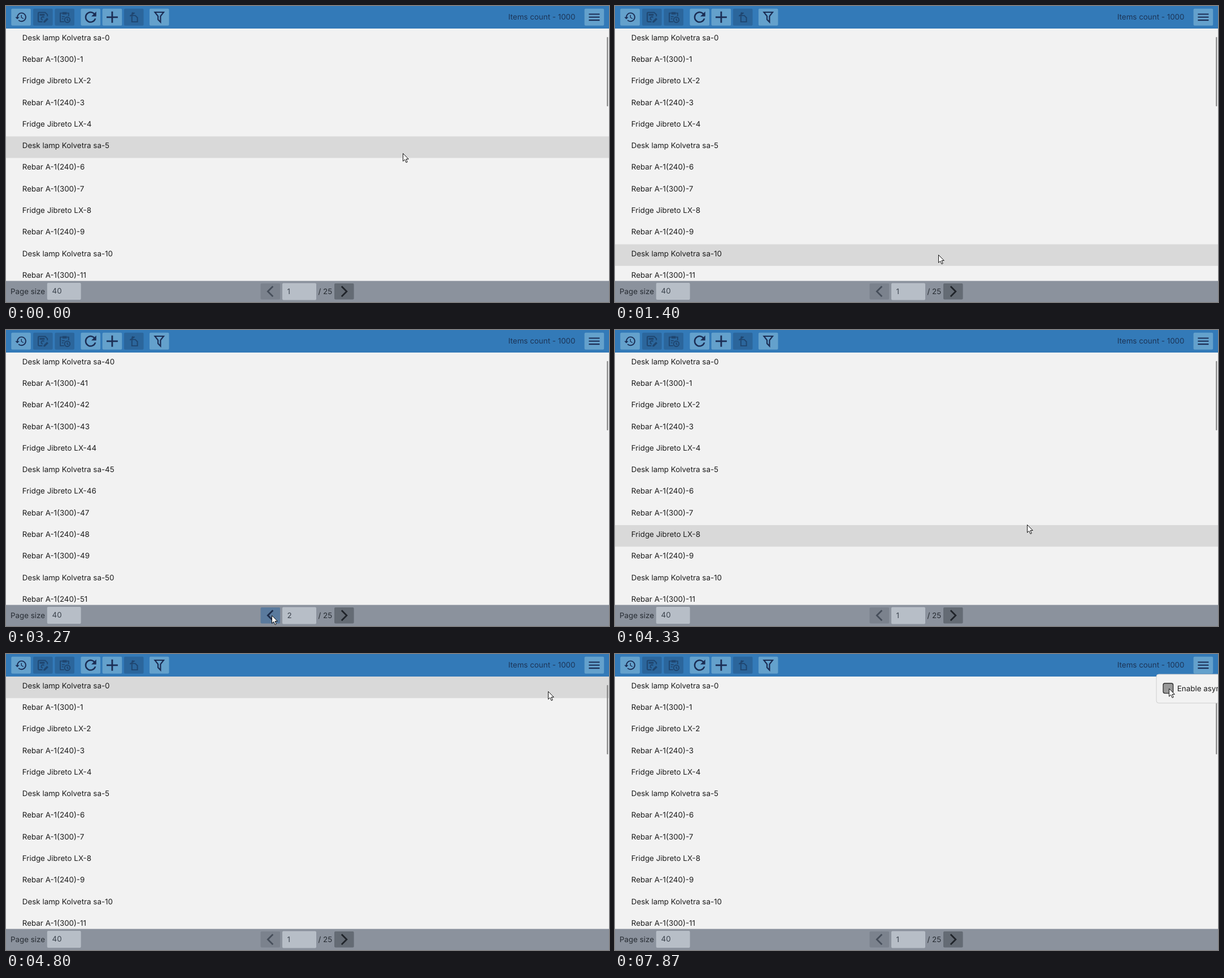
These frames come from a looping animation (1067x525 px, 8 s). An HTML page:

```html
<!DOCTYPE html>
<html lang="en">
<head>
<meta charset="utf-8">
<title>Paged list</title>
<style>
html, body { margin: 0; width: 100%; height: 100%; overflow: hidden; background: #f2f2f2; }
svg { display: block; width: 1067px; height: 525px; }
text { font: 13.39px Inter, sans-serif; fill: #1b1b1b; white-space: pre; text-rendering: geometricPrecision; }
.line { fill: none; stroke-width: 2; }
</style>
</head>
<body>
<svg id="stage" viewBox="0 0 1067 525">
  <rect width="1067" height="525" fill="#f2f2f2"/>
  <rect id="highlight" width="1067" height="38.26" fill="#d9d9d9"/>
  <g id="rows"></g>
  <path d="M1064.3 56V177" stroke="#7c7c7c" stroke-width="2" stroke-linecap="round"/>

  <rect width="1067" height="40" fill="#337ab8"/>
  <text x="888.8" y="24.2" style="fill:#1d3557">Items count - 1000</text>
  <g id="tools"></g>

  <rect y="487.6" width="1067" height="38" fill="#8b929d"/>
  <g fill="#b7bec7">
    <rect x="72.8" y="491" width="59.8" height="30" rx="2"/>
    <rect x="489" y="491.5" width="60" height="30" rx="2"/>
  </g>
  <text x="8" y="511" style="fill:#272c33">Page size</text>
  <text x="81.5" y="510.3" style="fill:#3a424c">40</text>
  <text id="page" x="497.5" y="511" style="fill:#3a424c">1</text>
  <text x="552.5" y="511" style="fill:#272c33">/ 25</text>
  <g id="pager"></g>

  <g id="popup">
    <rect x="958" y="36" width="200" height="51" rx="4" fill="#f2f2f2" stroke="#cfcfcf"/>
    <rect id="check" x="970" y="52" width="17.6" height="17.6" rx="3" stroke="#2b2b2b" stroke-width="1.3"/>
    <text x="994.8" y="65.5">Enable asynchronous</text>
  </g>
  <path id="cursor" d="M.5.5V14.3L3.7 11.3L6 16.6L8.2 15.7L6 10.5H10.3Z" fill="#fff" stroke="#111" stroke-linejoin="round"/>
</svg>
<script>
const LOOP = 8000, TICK = 200 / 3, PITCH = 38.26, TOP = 40;
const $ = id => document.getElementById(id);

function add(parent, tag, attrs) {
  const el = document.createElementNS("http://www.w3.org/2000/svg", tag);
  for (const key in attrs) el.setAttribute(key, attrs[key]);
  return parent.appendChild(el);
}
const inside = ([x, y], b) => x >= b.x && x < b.x + 34.6 && y >= b.y && y < b.y + b.h;

// Icons live on a 24-unit grid centred on their button.
function button(parent, x, y, h, scale, icon, line, fill, ink) {
  const box = add(parent, "rect", { x, y, width: 34.6, height: h, rx: 2, fill });
  const g = add(parent, "g", {
    transform: `translate(${x + 17.3} ${y + h / 2}) scale(${scale}) translate(-12 -12)`,
    fill: ink, stroke: ink, "stroke-width": 0
  });
  add(g, "path", { d: icon });
  if (line) add(g, "path", { d: line, class: "line" });
  return { x, y, h, box, g };
}

const ON = "#64a1cc", OFF = "#2b669c", HOVER = "#4b91c6", INK = "#1b2d54", DIM = "#1f4670";
const tool = (x, scale, icon, line, enabled = true) =>
  button($("tools"), x, 4.8, 30, scale, icon, line, enabled ? ON : OFF, enabled ? INK : DIM);

tool(9.3, .93, "M13.5 8H12V13L16.28 15.54L17 14.33L13.5 12.25ZM13 3A9 9 0 0 0 4 12H1L4.96 16.03L9 12H6A7 7 0 1 1 8.06 16.94L6.64 18.36A9 9 0 1 0 13 3");
tool(48.1, .98, "M13 19.5V22H15.5L21.8 15.7L19.3 13.2ZM6 6H15V9.5H6Z",
  "M11 20.3H5A1.5 1.5 0 0 1 3.5 18.8V5A1.5 1.5 0 0 1 5 3.5H16L20 7.5V10.5M14 12.5A2.8 2.8 0 1 0 11.5 17", false);
tool(86.4, .95, "M8 2.5H16V7H8Z", "M11 20.5H4V4.5H8M16 4.5H19.5V10M7 11H12M7 15H10M22 17A5 5 0 1 0 12 17A5 5 0 1 0 22 17M17 14.3V17.3L19.2 18.5", false);
tool(132.4, 1.25, "M17.65 6.35A8 8 0 1 0 19.73 14H17.65A6 6 0 1 1 16.22 7.78L13 11H20V4Z");
tool(170.6, 1.42, "M19 13H13V19H11V13H5V11H11V5H13V11H19Z");
tool(208.9, .98, "", "M8.5 9H14.5L18.5 13V20.5H8.5ZM5 10L13.5 4M8 5.5L11 3.5", false);
tool(253.9, 1.1, "", "M5 4H19L14 10.4V19.9L10 15.9V10.4Z");
const menu = tool(1023.6, 1.06, "M3 6H21V8H3ZM3 11H21V13H3ZM3 16H21V18H3Z");

const arrow = (x, line) => button($("pager"), x, 492, 28.6, 1, "", line, "#646b74", "#20242a");
const prev = arrow(450.5, "M16.5 3L7.5 12L16.5 21");
const next = arrow(581, "M7.5 3L16.5 12L7.5 21");
for (const b of [prev, next]) b.g.lastChild.style.strokeWidth = 2.8;

const names = { L: "Desk lamp Kolvetra sa-", F: "Fridge Jibreto LX-", 3: "Rebar A-1(300)-", 2: "Rebar A-1(240)-" };
const pages = ["L3F2FL23F2L3", "L323FLF323L2"];
const rows = [...pages[0]].map((_, i) => add($("rows"), "text", { x: 28.8, y: 60.9 + PITCH * i }));

// Pointer path: time, x, y
const path = [
  [0, 702, 261], [200, 702, 261], [333, 688, 249], [533, 640, 224], [733, 582, 222], [867, 551, 240],
  [933, 543, 257], [1000, 540, 278], [1067, 540, 301], [1200, 549, 357], [1333, 565, 425], [1400, 572, 441],
  [1533, 582, 476], [1667, 588, 495], [1867, 592, 502], [2600, 592, 502], [2800, 568, 503], [3067, 495, 505],
  [3267, 470, 506], [3333, 470, 506], [3400, 469, 506], [3800, 469, 506], [3933, 500, 492], [4133, 612, 428],
  [4333, 729, 345], [4467, 802, 228], [4600, 877, 115], [4667, 906, 107], [4733, 934, 76], [4800, 959, 66],
  [4933, 1005, 42], [5067, 1032, 26], [5200, 1040, 19], [5400, 1040, 19], [5533, 1059, 34], [5667, 1060, 51],
  [5800, 1059, 34], [5933, 1043, 20], [6067, 1043, 20], [6267, 1025, 28], [6533, 993, 41], [6600, 993, 41],
  [6733, 986, 50], [6933, 979, 58], [7000, 979, 58], [7067, 980, 61], [LOOP, 980, 61]
];
function pointer(t) {
  const i = Math.max(1, path.findIndex(p => p[0] >= t));
  const [t0, x0, y0] = path[i - 1], [t1, x1, y1] = path[i];
  const k = (t - t0) / (t1 - t0);
  return [x0 + (x1 - x0) * k, y0 + (y1 - y0) * k];
}

function setPager(b, enabled, hot) {
  b.box.setAttribute("fill", !enabled ? "#7b828d" : hot ? "#5a7a9d" : "#646b74");
  b.g.setAttribute("stroke", !enabled ? "#464e5a" : hot ? "#1c2c4a" : "#20242a");
}

let shown = -1;
function draw(time) {
  const t = Math.floor((time % LOOP + 4) / TICK) * TICK;
  const [x, y] = pointer(Math.min(t, LOOP));
  const felt = pointer(Math.max(0, t - TICK)); // hover follows one tick late
  const page = t > 2590 && t < 3520 ? 1 : 0;
  const open = t > 6120;

  $("cursor").setAttribute("transform", `translate(${Math.round(x)} ${Math.round(y)})`);
  const row = Math.floor((felt[1] - TOP) / PITCH);
  const lit = !open && felt[0] < 1058 && row >= 0 && felt[1] < 487.6;
  $("highlight").setAttribute("y", lit ? TOP + row * PITCH : -50);

  if (page !== shown) {
    rows.forEach((el, i) => el.textContent = names[pages[page][i]] + (page * 40 + i));
    $("page").textContent = page + 1;
    shown = page;
  }
  setPager(prev, page > 0, inside(felt, prev));
  setPager(next, true, inside(felt, next));
  menu.box.setAttribute("fill", !open && inside(felt, menu) ? HOVER : ON);
  $("popup").style.display = open ? "" : "none";
  $("check").setAttribute("fill", t > 7860 ? "#999" : "#f2f2f2");
}

const start = performance.now();
function frame() {
  draw(performance.now() - start);
  requestAnimationFrame(frame);
}
frame();
</script>
</body>
</html>
```
